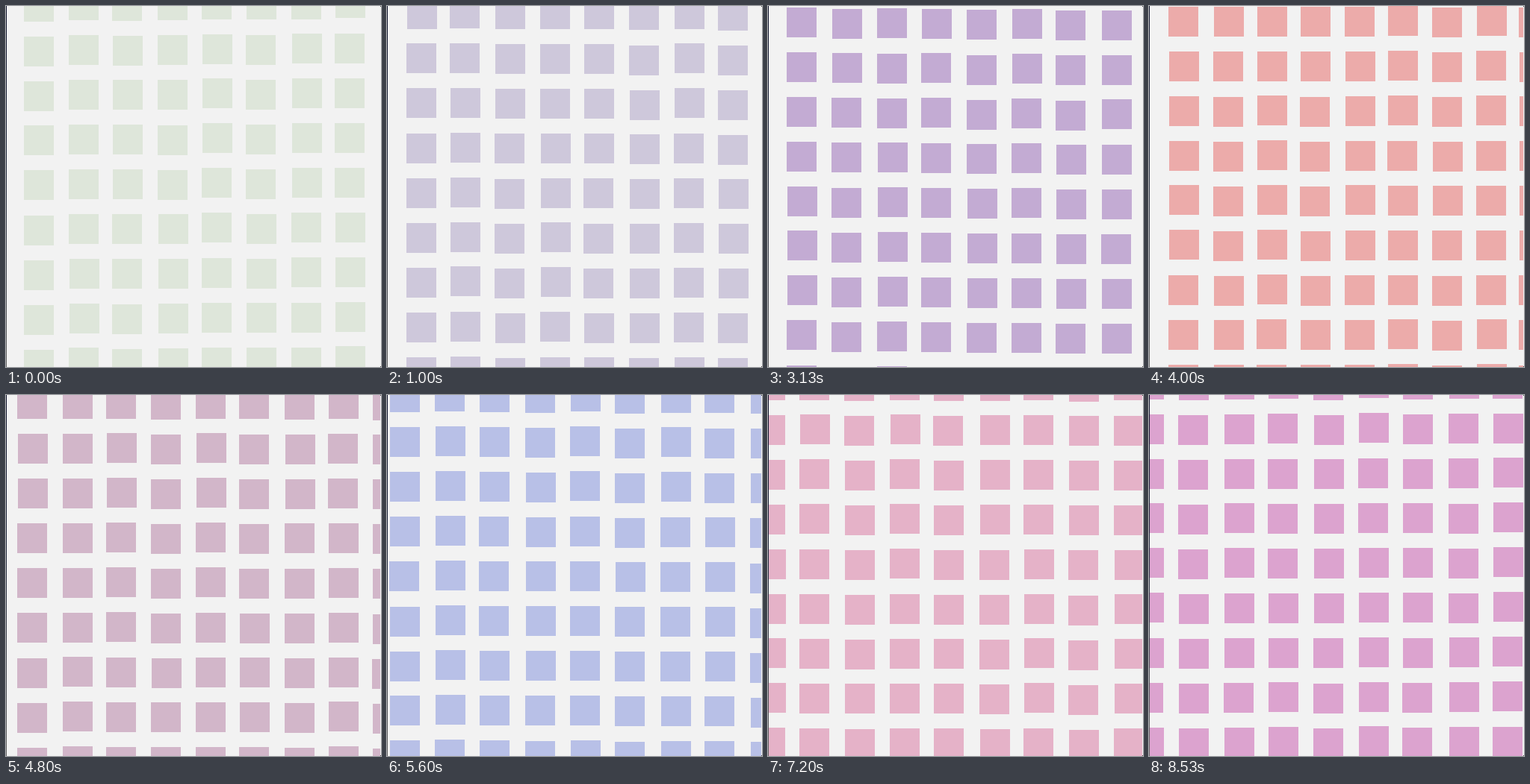
These frames come from a looping animation (502 by 484 pixels, 8.59 s). An HTML page with a canvas:

```html
<!DOCTYPE html>
<html lang="en">
<head>
<meta charset="utf-8">
<title>Drifting squares</title>
<style>
html, body { margin: 0; width: 100%; height: 100%; overflow: hidden; background: #f2f2f2; }
canvas { display: block; }
</style>
</head>
<body>
<canvas id="stage" width="502" height="484"></canvas>
<script>
const ctx = document.getElementById('stage').getContext('2d');
const W = 502, H = 484, LOOP = 8590, STEP = 1000 / 15;
const SIZE = 40, PITCH = 60, COUNT = 9, PAPER = '#f2f2f2';

// x, y: corner of the grid; dx, dy: extra shift of each further column.
const keys = [
  { t: 0, r: 222, g: 230, b: 218, x: 24, y: -20, dx: -0.4, dy: -0.4 },
  { t: 2000, r: 190, g: 170, b: 219, x: 26.7, y: 1, dx: 0, dy: 0.8 },
  { t: 3130, r: 195, g: 171, b: 211, x: 25.5, y: 2.5, dx: 0.1, dy: 0.5 },
  { t: 4000, r: 236, g: 171, b: 170, x: 27.5, y: 1, dx: -1.4, dy: 0 },
  { t: 5600, r: 184, g: 192, b: 231, x: 4, y: -17.7, dx: 0.3, dy: 0.3 },
  { t: 7200, r: 229, g: 178, b: 200, x: -17.3, y: -33, dx: 0, dy: 0.1 },
  { t: 8530, r: 220, g: 163, b: 207, x: -20, y: -33.5, dx: 0.1, dy: -0.2 }
];

function poseAt(t) {
  const next = Math.max(1, keys.findIndex(key => key.t > t));
  const b = t >= keys.at(-1).t ? keys.at(-1) : keys[next];
  const a = b === keys.at(-1) ? keys.at(-2) : keys[next - 1];
  const k = Math.min(1, (t - a.t) / (b.t - a.t));
  const pose = {};
  for (const name in a) pose[name] = a[name] + (b[name] - a[name]) * k;
  return pose;
}

// Slow uneven drift: columns differ from each other, rows only slightly.
function wander(row, col, t, seed) {
  const phase = col * 2.4 + seed + t / 900;
  return 0.8 * Math.sin(phase) + 0.5 * Math.sin(row * 0.7 + phase * 1.3);
}

// Whole steps at 15 per second, with one short rest.
function stepTime(ms) {
  const t = Math.floor((ms % LOOP + 4) / STEP) * STEP;
  return t > 1200 && t < 1395 ? 1200 : t;
}

const edge = ctx.createLinearGradient(0, 0, 0, H);
edge.addColorStop(0, '#10142c');
edge.addColorStop(0.4, '#20283c');
edge.addColorStop(1, '#666');

function draw(ms) {
  const t = stepTime(ms), pose = poseAt(t);
  ctx.fillStyle = PAPER;
  ctx.fillRect(0, 0, W, H);

  ctx.fillStyle = `rgb(${[pose.r, pose.g, pose.b].map(Math.round)})`;
  for (let col = 0; col < COUNT; col++) {
    for (let row = 0; row < COUNT; row++) {
      const x = pose.x + col * (PITCH + pose.dx) + wander(row, col, t, 0);
      const y = pose.y + col * pose.dy + row * PITCH + wander(row, col, t, 1.7);
      ctx.fillRect(Math.round(x), Math.round(y), SIZE, SIZE);
    }
  }

  ctx.fillStyle = PAPER;
  ctx.fillRect(W - 1, 0, 1, H);
  ctx.fillStyle = edge;
  ctx.fillRect(0, 0, 1, H);
  ctx.fillStyle = '#444';
  ctx.fillRect(W - 1, 0, 1, 1);
  ctx.fillRect(W - 1, H - 1, 1, 1);
}

const start = performance.now();
function tick() {
  draw(performance.now() - start);
  requestAnimationFrame(tick);
}
tick();
</script>
</body>
</html>
```
